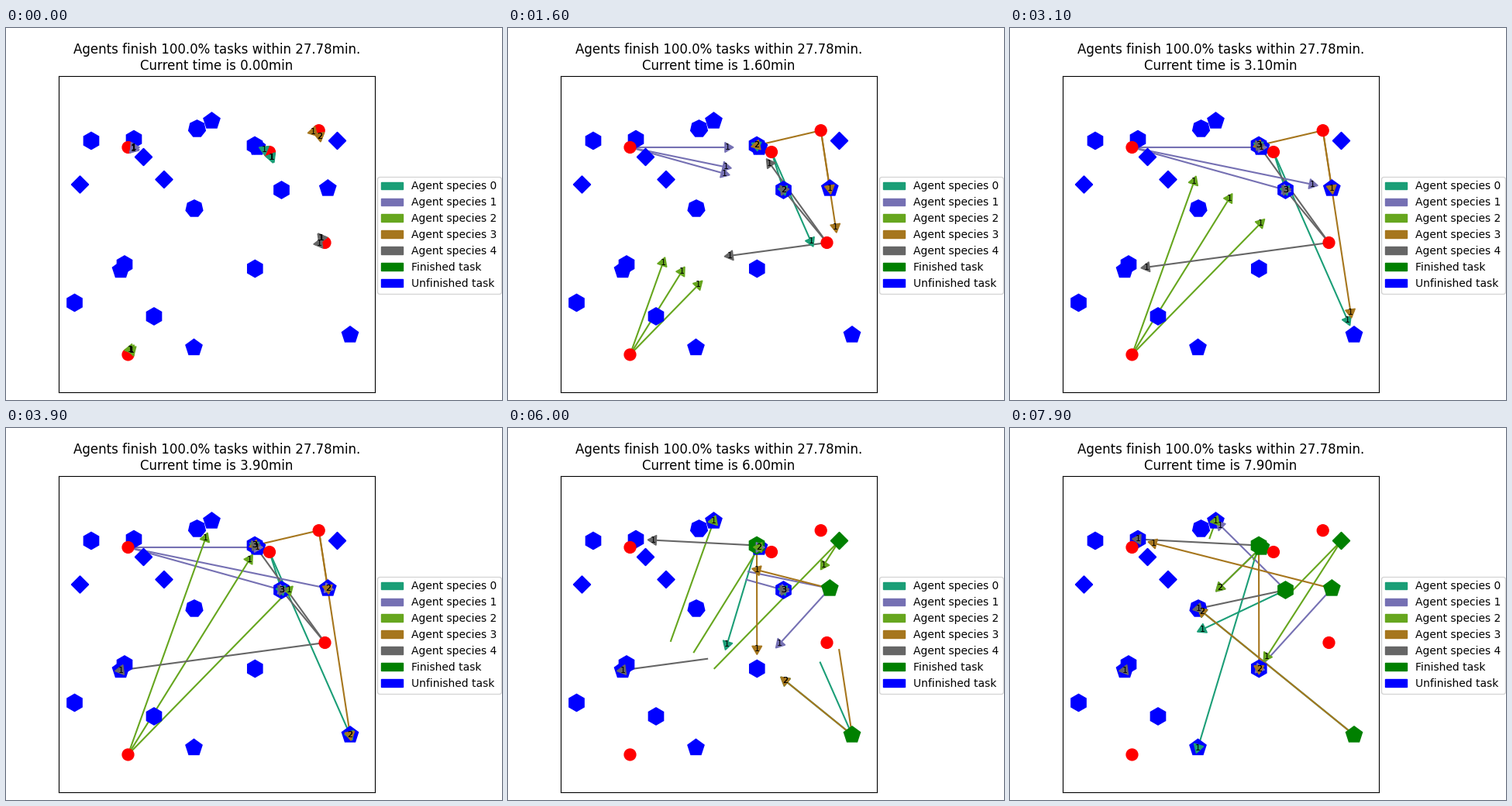
Recreate the animation shown at these times as a matplotlib script. Size 640x480 px, loop 8000 ms.

```python
import numpy as np
import matplotlib.pyplot as plt
from matplotlib.animation import FuncAnimation
from matplotlib.patches import Circle, Patch, RegularPolygon

FRAMES = 80
INTERVAL = 100
DT = 0.1            # minutes per frame
UNIT = 408 / 11     # pixels per world unit
STEP = 0.2 * UNIT   # distance covered per frame
TRAIL = 40          # frames of visible trail
SAME_PLACE = 0.25   # agents closer than this share a count

SPECIES = [plt.get_cmap("Dark2")(i) for i in (0, 2, 4, 6, 7)]
DEPOTS = [(340, 160), (157.5, 154), (157.5, 421.5), (403.7, 132.2), (411.5, 277)]

# name: (x, y, corners, frame at which the task is finished)
TASKS = {
    "west_low": (88.5, 354.5, 6, None),
    "west_top": (110, 145.5, 6, None),
    "north_west": (165, 143.5, 6, None),
    "twin_low": (324, 154, 5, 70),
    "twin_top": (321, 151.5, 6, 43),
    "hub": (355.5, 209, 6, 64),
    "pair_top": (153, 305, 6, None),
    "pair_low": (148, 312.5, 5, None),
    "south": (321.3, 310.5, 6, None),
    "south_west": (191, 372, 6, None),
    "north": (265.5, 120, 5, None),
    "north_big": (246.5, 130, 7, None),
    "centre": (243, 233, 7, None),
    "east": (415.3, 207, 5, 48),
    "south_east": (444, 396, 5, 46),
    "bottom": (242.5, 412.5, 5, None),
    "gem_a": (177.5, 166.5, 4, None),
    "gem_b": (204, 195.5, 4, None),
    "gem_c": (95.5, 202, 4, None),
    "gem_d": (427.5, 145.5, 4, 56),
}

# (species, first task, second task); the second leg starts when the first task is done
ROUTES = [
    (0, "twin_top", "bottom"),
    (0, "hub", "pair_top"),
    (0, "south_east", "centre"),
    (1, "twin_low", "centre"),
    (1, "east", "south"),
    (1, "hub", "north"),
    (2, "north", None),
    (2, "twin_low", "centre"),
    (2, "gem_d", "south"),
    (3, "twin_top", "south"),
    (3, "east", "north_west"),
    (3, "south_east", "centre"),
    (4, "pair_low", None),
    (4, "hub", "centre"),
    (4, "twin_top", "north_west"),
]


def point(x, y):
    return np.array([x, 480 - y], float)


def place(task):
    return point(*TASKS[task][:2])


def travel(species, first, second):
    """Position and heading of one agent in every frame."""
    pos, goal, heading = point(*DEPOTS[species]), place(first), 0.0
    path, headings = [], []
    for k in range(FRAMES):
        if second and k == TASKS[first][3]:
            goal = place(second)
        gap = goal - pos
        dist = np.hypot(*gap)
        if dist > 1e-9:
            heading = np.arctan2(gap[1], gap[0])
            pos = goal if dist <= STEP else pos + gap / dist * STEP
        path.append(pos)
        headings.append(heading)
    return np.array(path), headings


agents = [travel(*r) for r in ROUTES]
paths = np.array([path for path, _ in agents])

fig = plt.figure(figsize=(6.4, 4.8), dpi=100)
ax = fig.add_axes([68 / 640, 0.02, 408 / 640, 0.85])
ax.set(xlim=(68, 476), ylim=(9.6, 417.6), xticks=[], yticks=[])
title = ax.set_title("", fontsize=12)

handles = [Patch(color=c, label=f"Agent species {i}") for i, c in enumerate(SPECIES)]
handles += [Patch(color="g", label="Finished task"),
            Patch(color="b", label="Unfinished task")]
ax.legend(handles=handles, loc="upper left", bbox_to_anchor=(0.99, 0.7), fontsize=10)

task_marks = [
    (ax.add_patch(RegularPolygon(point(x, y), corners, radius=0.3 * UNIT, color="b")), done)
    for x, y, corners, done in TASKS.values()
]
for depot in DEPOTS:
    ax.add_patch(Circle(point(*depot), 0.2 * UNIT, color="r"))

trails, arrows, counts = [], [], []
for species, *_ in ROUTES:
    color = SPECIES[species]
    trails += ax.plot([], [], color=color, lw=1.5, zorder=0)
    arrows.append(ax.add_patch(RegularPolygon((0, 0), 3, radius=0.2 * UNIT, color=color)))
    counts.append(ax.text(0, 0, "", fontsize=8, ha="center", va="center"))


def draw(k):
    title.set_text("Agents finish 100.0% tasks within 27.78min.\n"
                   f"Current time is {k * DT:.2f}min")
    for mark, done in task_marks:
        mark.set_color("g" if done is not None and k >= done else "b")
    spots = paths[:, k]
    for i, (path, headings) in enumerate(agents):
        trails[i].set_data(*path[max(0, k - TRAIL):k + 1].T)
        arrows[i].xy = tuple(spots[i])
        arrows[i].orientation = headings[k] - np.pi / 2
        near = np.hypot(*(spots - spots[i]).T) < SAME_PLACE
        counts[i].set_position(spots[i])
        counts[i].set_text(str(near.sum()))
    return [title, *trails, *arrows, *counts]


anim = FuncAnimation(fig, draw, frames=FRAMES, interval=INTERVAL,
                     repeat=True, repeat_delay=0, blit=False)
plt.show()
```
